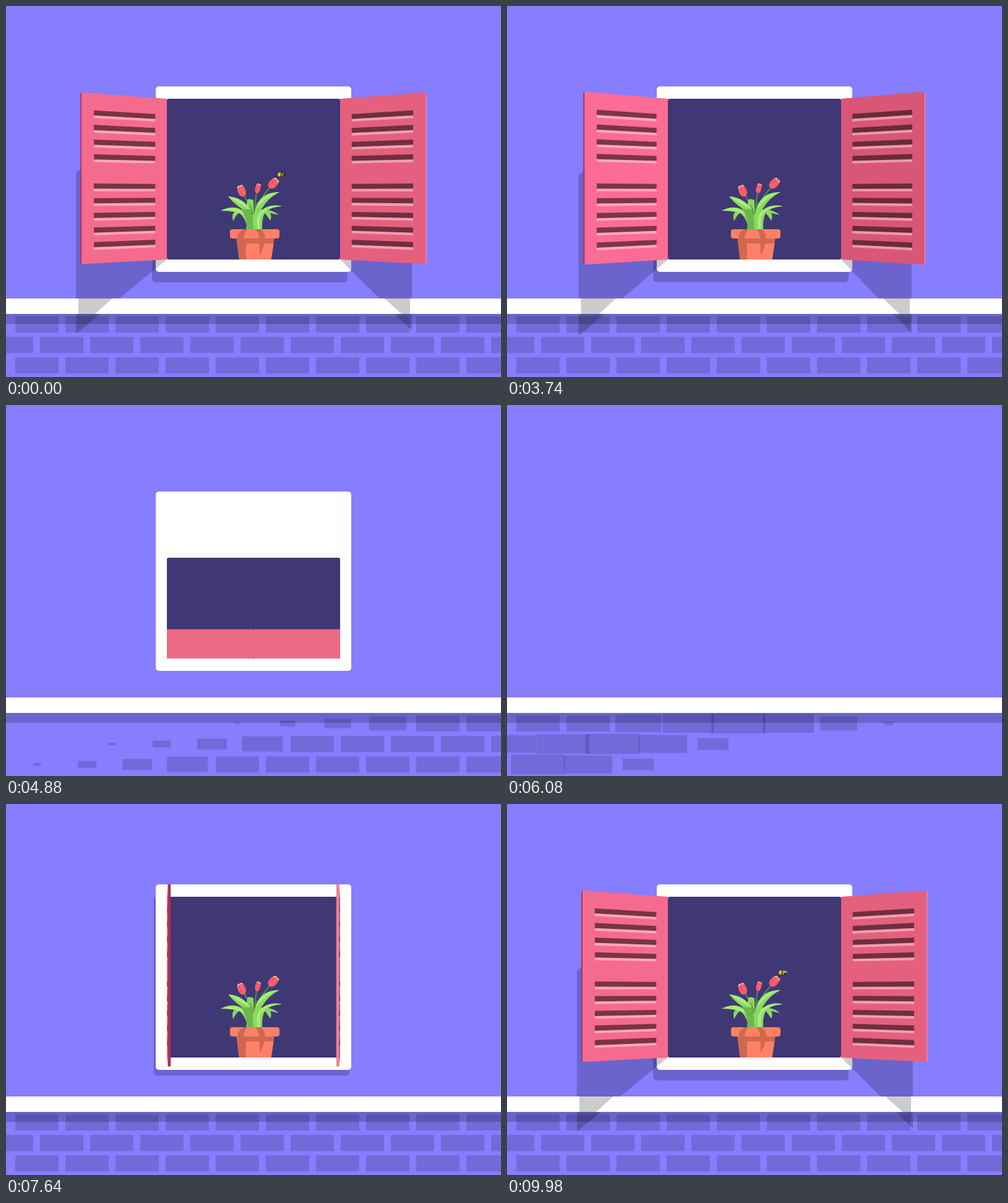
An HTML page with a canvas for the animation above (10 s loop, 800 px wide and 600 px high).

```html
<!DOCTYPE html>
<html lang="en">
<head>
<meta charset="utf-8">
<title>Window</title>
<style>
  html, body { margin: 0; width: 100%; height: 100%; overflow: hidden; background: #867dff; }
  canvas { display: block; width: 800px; height: 600px; }
</style>
</head>
<body>
<canvas id="stage" width="800" height="600"></canvas>
<script>
const ctx = document.getElementById('stage').getContext('2d');
const LOOP = 10000, DEPTH = 1100, OPEN = 150;
const SHADE = 'rgba(0,0,0,.2)';

// Timing helpers
const clamp = v => Math.min(1, Math.max(0, v));
const part = (t, start, dur) => clamp((t - start) / dur);
const ease = u => (1 - Math.cos(Math.PI * u)) / 2;
const backOut = u => 1 + 4 * (u - 1) ** 3 + 3 * (u - 1) ** 2;
const lerp = (a, b, u) => a + (b - a) * u;
// 1 at rest, down to 0 from `out`, back up from `back`
const leaveAndReturn = (t, out, back, dur) =>
  t < 5500 ? 1 - ease(part(t, out, dur)) : ease(part(t, back, dur));
const mix = (a, b, u) => `rgb(${a.map((v, i) => Math.round(lerp(v, b[i], u)))})`;

// Drawing helpers
function fill(color, d) {
  ctx.fillStyle = color;
  ctx.fill(new Path2D(d));
}
function line(color, width, d) {
  ctx.strokeStyle = color;
  ctx.lineWidth = width;
  ctx.stroke(new Path2D(d));
}
function box(color, x, y, w, h, r = 0) {
  if (h <= 0 || w <= 0) return;
  ctx.fillStyle = color;
  ctx.beginPath();
  ctx.roundRect(x, y, w, h, Math.min(r, h / 2));
  ctx.fill();
}
function poly(color, points) {
  ctx.fillStyle = color;
  ctx.beginPath();
  points.forEach(p => ctx.lineTo(...p));
  ctx.fill();
}
function oval(color, x, y, rx, ry, turn = 0) {
  ctx.fillStyle = color;
  ctx.beginPath();
  ctx.ellipse(x, y, rx, ry, turn, 0, 7);
  ctx.fill();
}
function placed(x, y, turn, sx, sy, draw) {
  ctx.save();
  ctx.translate(x, y);
  ctx.rotate(turn);
  ctx.scale(sx, sy);
  draw();
  ctx.restore();
}

function bricks(t) {
  for (let row = 0; row < 3; row++) {
    const lag = [0, 98, 184][row];
    for (let i = 0; i < 11; i++) {
      const wait = lag + i * 43;
      const s = t < 5500
        ? 1 - part(t, 4558 + wait, 168)
        : backOut(part(t, 5770 + wait, 270));
      const x = (row === 1 ? 9 : 50) + i * 81, y = 515 + row * 33;
      if (s > 0) box('rgba(0,0,0,.15)', x - 35 * s, y - 13 * s + (row ? .3 : 0), 70 * s, 26 * s);
    }
  }
}

function tulip(x, y, turn, sx, sy) {
  placed(x, y, turn, sx, sy, () => {
    fill('#fa626d', 'M0 9.5C-7 9.5-8 0-5-8Q-2-10 0-9Q3-10 5-8C8 0 7 9.5 0 9.5Z');
    fill('#e84c60', 'M-1 9C-4 4-4-3-2-9L-1-9C-2-3-2 3-1 9ZM3 8C5 3 5-3 3-9L4-9C7-2 6 5 3 8Z');
    fill('#ffb993', 'M-5-8Q-2-11 0-9L-1-7Q-3-8-5-5ZM1-9Q4-10 5-8L5-5Q4-8 1-7Z');
  });
}

function plant(reach) {
  const dx = 21 * reach, dy = -21 * reach;
  const stem = '#568a4d';
  ctx.lineCap = 'round';
  line(stem, 2, 'M399 337Q393 320 385 307');
  line(stem, 2, 'M400 337Q403 316 405 302');
  line(stem, 2, `M400 336Q407 317 ${426 + dx} ${294 + dy}`);
  tulip(381, 299, -.4, .95, 1);
  tulip(407, 295, .25, .63, .82);
  tulip(432 + dx, 287 + dy, .75, 1, 1);

  const leaf = '#8bd85f', pale = '#a8ec7c', deep = '#6cb64c';
  fill(leaf, 'M388 362C391 345 387 328 390 313Q395 311 400 314L400 335L407 318L414 330L414 362Z');
  fill(leaf, 'M359 308C376 309 392 318 397 338L388 332Q372 324 359 308Z');
  fill(pale, 'M359 308C376 310 388 317 394 329Q376 320 359 308Z');
  fill(leaf, 'M402 337C404 314 418 300 442 301Q424 310 414 327Z');
  fill(pale, 'M404 329C408 311 422 302 442 301Q419 309 404 329Z');
  fill(leaf, 'M347 331C366 321 385 325 391 344L391 362Q387 342 377 335Q372 337 367 348Q364 338 369 333Q358 331 347 331Z');
  fill(pale, 'M347 331C366 322 382 327 388 341Q374 329 347 331Z');
  fill(leaf, 'M406 362C402 337 420 317 446 324Q431 325 424 330Q434 332 441 338L427 335Q430 341 427 347Q422 339 418 335Q413 345 414 362Z');
  fill(pale, 'M405 348C407 328 425 319 446 324Q420 324 411 341L410 362L406 362Z');
  fill(deep, 'M380 328Q390 330 398 328L400 362L390 362Q389 341 380 328Z');
  line(stem, 1.4, 'M394 322Q399 331 398 338M405 318L400 336');
}

function pot() {
  const clay = '#ff8066', dark = '#d0684f';
  fill(dark, 'M372 374H434L428.500 410H376.500Z');
  fill(clay, 'M388 384H432.500L428.500 410H388Z');
  fill(dark, 'M409 375H419Q417 392 410 403Z');
  box(clay, 362, 361, 80, 15, 4);
  fill(dark, 'M374 376Q375 364 384 361H391Q385 365 384 376Z');
  fill(dark, 'M402 361H412Q418 365 419 376H409Q409 366 402 361Z');
}

// Shadow of a shutter, wall part or ledge part
function cast(side, foot, width, drop, a) {
  const k = (OPEN - a) / 60;
  if (k >= 1) return;
  const x = 400 + side * 140, w = side * width * (1 - k ** 1.5), d = drop + 55 * k;
  poly(SHADE, [[x, foot - 260], [x + w, foot - 260 + d], [x + w, foot + d], [x, foot]]);
}
function clipped(bands, draw) {
  ctx.save();
  ctx.beginPath();
  bands.forEach(([y, h]) => ctx.rect(0, y, 800, h));
  ctx.clip();
  draw();
  ctx.restore();
}
function shutterShadows(a) {
  clipped([[0, 473], [498, 102]], () => {
    cast(-1, 410, 147, 120, a);
    cast(1, 410, 116, 115, a);
  });
  clipped([[473, 25]], () => {
    cast(-1, 394, 143, 128, a);
    cast(1, 409, 113, 101, a);
  });
}

function slatWidth(t, i) {
  const fromBottom = 8 - i;
  return 100 * (t < 5500
    ? 1 - part(t, 4420 + i * 37, 110)
    : part(t, 6696 + fromBottom * 40, 110));
}

function shutter(t, side, a, height) {
  if (height <= 0) return;
  const rad = a * Math.PI / 180, c = Math.cos(rad), s = Math.sin(rad);
  const at = (u, y, w = 0) => {
    const x = side * 140 - side * u * c + side * s * w;
    const k = DEPTH / (DEPTH - u * s - c * w);
    return [400 + x * k, 300 + (y - 300) * k];
  };
  const rect = (color, u0, u1, y0, y1) =>
    poly(color, [at(u0, y0), at(u1, y0), at(u1, y1), at(u0, y1)]);
  const top = 410 - 260 * height, bottom = 410;
  const lit = a < 146 ? clamp(a / 60) : 1 - (a - 146) / 8;
  const tone = side < 0 ? [252, 108, 149] : [218, 86, 118];
  const back = a > 90 ? 4 : -4;

  if (a > 0) {
    poly(side < 0 ? '#ab2d53' : '#f0819b',
      [at(139, top + 1), at(139.5, top + 1, back), at(139.5, bottom - 1, back), at(139, bottom - 1)]);
  }
  const end = a > 0 ? 139 : 140;
  poly(mix([237, 106, 133], tone, lit), [
    at(0, top), at(end - 1.5, top), at(end, top + 1.5),
    at(end, bottom - 1.5), at(end - 1.5, bottom), at(0, bottom)
  ]);
  for (let i = 0; i < 9; i++) {
    const w = slatWidth(t, i);
    const y = 175.800 + 22.400 * (i < 4 ? i : i + 1);
    if (!w || y < top) continue;
    rect('rgba(0,0,0,.51)', 120 - w, 120, y, y + 8);
    rect('rgba(255,255,255,.4)', 120 - w, 120, y + 8, y + 12);
  }
}

function bee(t) {
  let x = 445, y = 273, bob = 0;
  if (t > 830 && t < 5000) {
    const u = (t - 830) / 730;
    x = u < 1 ? lerp(445, 330, u) : 330 - (t - 1560) * .163;
    y = lerp(273, 227, ease(clamp(u)));
    bob = 9 * Math.sin((t - 1560) / 260) * clamp(u);
  } else if (t > 5000 && t < 9650) {
    const u = (t - 7800) / 1850;
    if (u < 0) return;
    x = lerp(807, 445, u);
    y = lerp(262, 273, u);
    bob = 9 * Math.sin((t - 8240) / 260) * clamp((1 - u) * 4);
  }
  if (x < -10) return;
  placed(x, y + bob, .12, 1, 1, () => {
    oval('#2b2620', 1, 0, 6, 3.6);
    oval('#f2dc1c', -2.500, -.2, 3.400, 3.200);
    box('#f2dc1c', 1.800, -2.800, 1.300, 5.600);
    box('#2b2620', -1.500, -2.900, 1.300, 5.800);
    oval('#2b2620', -4.600, -.6, .7, .8);
    if (Math.floor(t / 20) % 2) oval('rgba(205,205,210,.75)', 4, -2.200, 4, 1.500, .15);
    else oval('rgba(60,55,50,.8)', 4.500, .8, 2.500, 1.200, .3);
  });
}

function draw(t) {
  const swing = t < 5500 ? 1 - ease(part(t, 3662, 750)) : ease(part(t, 7190, 850));
  const angle = OPEN * swing;
  const frame = leaveAndReturn(t, 4843, 6352, 325);
  const hole = leaveAndReturn(t, 4745, 6452, 325);
  const panel = leaveAndReturn(t, 4647, 6552, 325);
  const reach = ease(part(t, 830, 550)) - ease(part(t, 1950, 600));

  box('#867dff', 0, 0, 800, 600);
  bricks(t);
  box('#fff', 0, 473, 800, 25);
  box(SHADE, 0, 498, 800, 16);

  if (swing > 0) box(SHADE, 242 - 6 * swing, 150, 316, 280 + 17 * swing, 6);
  box('#fff', 242, 430 - 300 * frame, 316, 300 * frame, 5);
  box('#3f3875', 260, 410 - 260 * hole, 280, 260 * hole, 3);
  if (swing > 0) {
    plant(reach);
    pot();
    shutterShadows(angle);
  }
  shutter(t, -1, angle, panel);
  shutter(t, 1, angle, panel);
  bee(t);
}

const begin = performance.now();
function tick() {
  draw((performance.now() - begin) % LOOP);
  requestAnimationFrame(tick);
}
tick();
</script>
</body>
</html>
```
